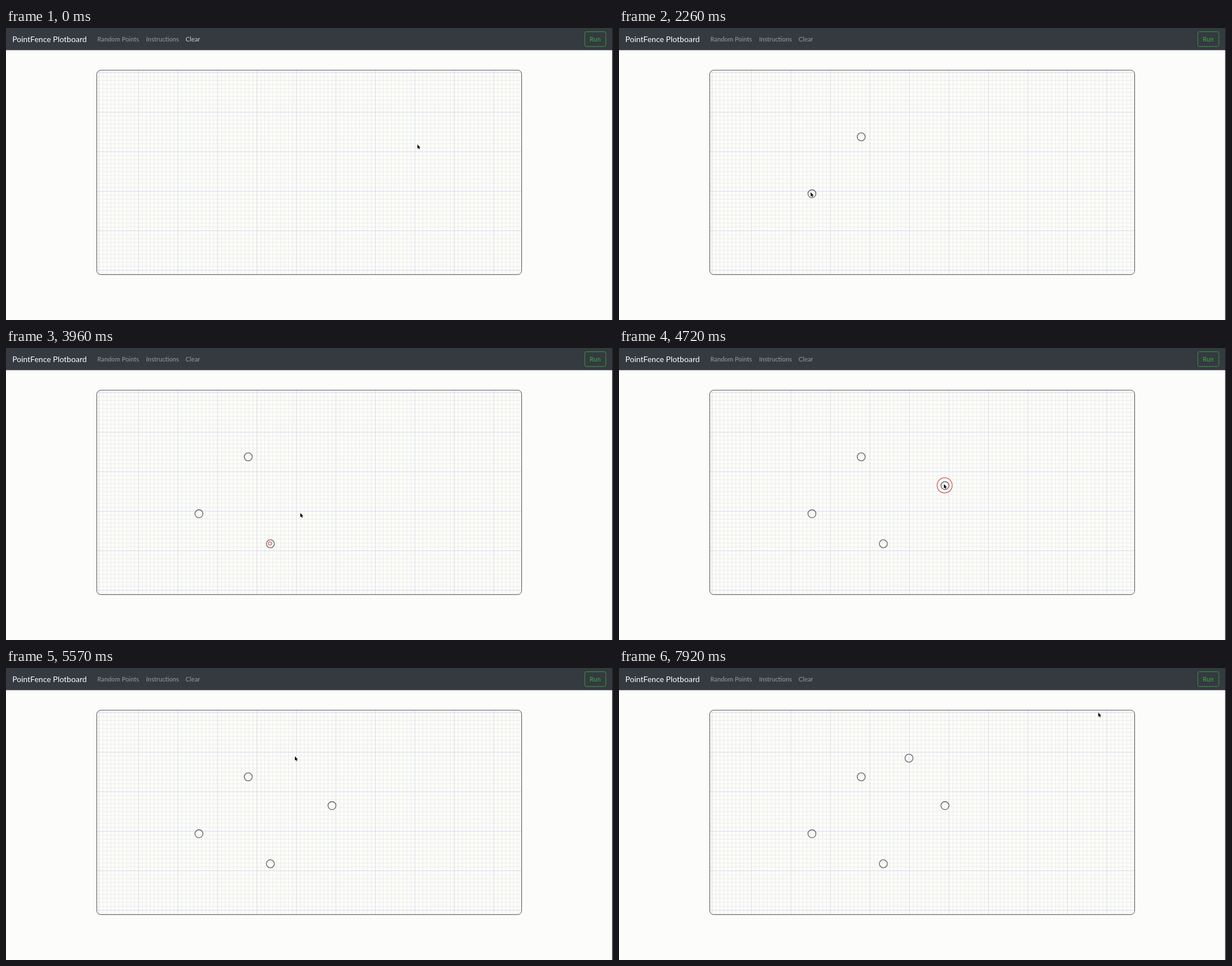
An HTML page that plays this animation: 1080x519 px, repeating every 8000 ms.

```html
<!DOCTYPE html>
<html lang="en">
<head>
<meta charset="utf-8">
<title>PointFence Plotboard</title>
<style>
  html, body { margin: 0; width: 100%; height: 100%; overflow: hidden; background: #fcfdfb; }
  svg { display: block; width: 100%; height: 100%; }
  text { font: 11.25px Lato, sans-serif; fill: #9a9da0; }
  .brand { font-size: 14.06px; fill: #fff; }
  .run { fill: #41ac45; }
  .minor { stroke: #e9eae4; stroke-width: .8; }
  .major { stroke: #d9d9e3; stroke-width: 1; }
  .rows { stroke: #d5d5eb; }
  #dots circle { fill: none; stroke: #5c5c5e; stroke-width: 1.3; }
  #dots .ring { stroke: #db5053; stroke-width: 1.25; }
</style>
</head>
<body>
<svg viewBox="0 0 1080 519" preserveAspectRatio="none">
  <rect width="1080" height="39.4" fill="#343a3f"/>
  <text class="brand" x="11.2" y="24.7">PointFence Plotboard</text>
  <text x="162.4" y="24">Random Points</text>
  <text x="249.3" y="24">Instructions</text>
  <text id="clear" x="319.6" y="24">Clear</text>
  <rect x="1029.8" y="6.6" width="37.4" height="26.3" rx="2.8" fill="none" stroke="#3a9c40"/>
  <text class="run" x="1048.3" y="24" text-anchor="middle">Run</text>
  <clipPath id="clip"><rect x="161.5" y="75" width="756" height="363.3" rx="7"/></clipPath>
  <g id="grid" fill="none" clip-path="url(#clip)"></g>
  <rect x="161.5" y="75" width="756" height="363.3" rx="7" fill="none" stroke="#3c3c3c" stroke-width=".9"/>
  <g id="dots"></g>
  <path id="cursor" d="M0 0V7.5L1.8 5.9L3 8.5L4.3 7.9L3.1 5.4H5.5Z" fill="#080808" stroke="#fff" stroke-width=".5" paint-order="stroke"/>
  <rect x="1078.6" width="1.4" height="519" fill="#1f2224"/>
</svg>
<script>
const LOOP = 8000, RIPPLE = 800, RING = 14.2;
const $ = id => document.getElementById(id);

function add(parent, tag, attrs) {
  const el = document.createElementNS('http://www.w3.org/2000/svg', tag);
  for (const k in attrs) el.setAttribute(k, attrs[k]);
  return parent.appendChild(el);
}

// Grid: fine lines first, every tenth one stronger
const cell = 7.025, left = 165.5, top0 = 79.4;
let minor = '', rows = '', cols = '';
for (let i = 0; i < 108; i++) {
  const line = `M${left + i * cell} 75V439`;
  if (i % 10) minor += line; else cols += line;
}
for (let i = 0; i < 52; i++) {
  const line = `M161 ${top0 + i * cell}H918`;
  if (i % 10) minor += line; else rows += line;
}
add($('grid'), 'path', { class: 'minor', d: minor });
add($('grid'), 'path', { class: 'major', d: cols });
add($('grid'), 'path', { class: 'major rows', d: rows });

// Clicked points: time, x, y
const dots = [
  [1210, 431, 193.5],
  [2260, 343.3, 294.6],
  [3280, 470.4, 348],
  [4380, 580, 244.6],
  [5960, 516, 160.3]
].map(([at, cx, cy]) => ({
  at,
  dot: add($('dots'), 'circle', { cx, cy, r: 7.1 }),
  ring: add($('dots'), 'circle', { class: 'ring', cx: cx - .6, cy: cy - .4 })
}));

// Cursor moves: start, end, x, y
const home = [732, 207];
const moves = [
  [570, 930, 429.3, 191],
  [1560, 2080, 341, 292],
  [2700, 3280, 468.3, 345.5],
  [3760, 4160, 578, 242],
  [4720, 5320, 514, 157],
  [6420, 6760, 640, 138],
  [7120, 7540, 849, 81],
  [7919, 7920, 852.7, 79.3]
];

const clamp = v => Math.min(1, Math.max(0, v));
const smooth = u => u * u * (3 - 2 * u);

function cursorAt(t) {
  let [x, y] = home;
  for (const [from, to, nx, ny] of moves) {
    const u = smooth(clamp((t - from) / (to - from)));
    x += (nx - x) * u;
    y += (ny - y) * u;
  }
  return [x, y];
}

function draw(now) {
  const t = now % LOOP;
  for (const { at, dot, ring } of dots) {
    const u = (t - at) / RIPPLE;
    const live = u > 0 && u < 1;
    dot.style.display = t >= at ? '' : 'none';
    ring.style.display = live ? '' : 'none';
    if (live) {
      const s = Math.sin(Math.PI * u) ** 2;
      ring.setAttribute('r', RING * s);
      ring.style.opacity = Math.min(1, .35 + s * 3);
    }
  }
  const [x, y] = cursorAt(t);
  $('cursor').setAttribute('transform', `translate(${x} ${y})`);
  const glow = 1 - clamp((t - 80) / 130);
  const c = 154 + 54 * glow;
  $('clear').style.fill = `rgb(${c},${c + 2},${c + 4})`;
  requestAnimationFrame(() => draw(performance.now()));
}
draw(performance.now());
</script>
</body>
</html>
```
